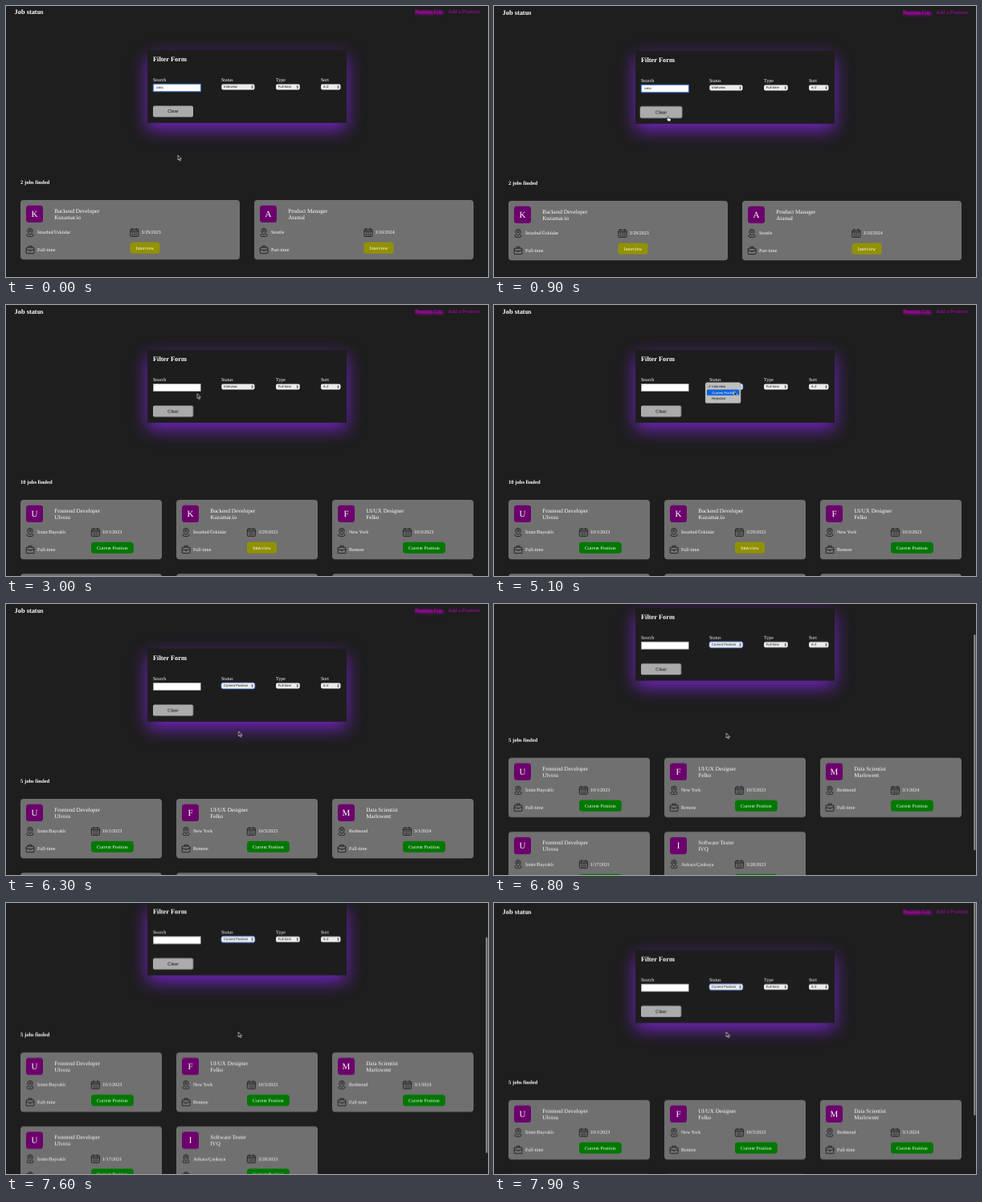
An HTML page that plays this animation: 600x338 px, repeating every 8000 ms.

```html
<!DOCTYPE html>
<html lang="en">
<head>
<meta charset="utf-8">
<title>Job status</title>
<style>
html, body { margin: 0; width: 100%; height: 100%; overflow: hidden; background: #1e1e1e; }
svg { display: block; width: 100vw; height: 100vh; }
text { font-family: "Liberation Serif", "Times New Roman", serif; fill: #fff; text-rendering: geometricPrecision; white-space: pre; }
.b { font-weight: bold; }
.ui { font-family: "Liberation Sans", Arial, sans-serif; fill: #161616; }
.link { fill: #bd00bd; }
.active { filter: drop-shadow(1px 1.2px .8px #d000d0) drop-shadow(1px 1px 1.5px #a000a0); }
.glow { fill: #7a26d0; opacity: .92; filter: blur(11px); }
.icon { fill: none; stroke: #141414; stroke-width: .8; stroke-linejoin: round; }

/* hard state changes */
.st { animation: 8s step-end infinite; }
.found { animation-name: found; }
.all { animation-name: all; }
.current { animation-name: current; }
.before { animation-name: before; }
.menu { animation-name: menu; }
.focus { animation-name: focus; }
.arrow { animation-name: arrow; }
.hand { animation-name: hand; }
.bar { animation-name: bar; }
.mark { animation-name: mark; }
.row0 { animation-name: row0; }
.row1 { animation-name: row1; }
@keyframes found { 0% { opacity: 1 } 13.75%, 100% { opacity: 0 } }
@keyframes all { 0% { opacity: 0 } 13.75% { opacity: 1 } 72.5%, 100% { opacity: 0 } }
@keyframes current { 0% { opacity: 0 } 72.5%, 100% { opacity: 1 } }
@keyframes before { 0% { opacity: 1 } 72.5%, 100% { opacity: 0 } }
@keyframes menu { 0% { opacity: 0 } 51.25% { opacity: 1 } 71.25%, 100% { opacity: 0 } }
@keyframes focus { 0% { opacity: 0 } 51.25%, 100% { opacity: 1 } }
@keyframes arrow { 0% { opacity: 1 } 10.3% { opacity: 0 } 24.25%, 100% { opacity: 1 } }
@keyframes hand { 0% { opacity: 0 } 10.3% { opacity: 1 } 24.25%, 100% { opacity: 0 } }
@keyframes bar { 0% { opacity: 0 } 83%, 100% { opacity: 1 } }
@keyframes mark { 0% { transform: translateY(-7.5px) } 62%, 100% { transform: none } }
@keyframes row0 { 0% { fill: #fff } 62%, 100% { fill: #161616 } }
@keyframes row1 { 0% { fill: #161616 } 62%, 100% { fill: #fff } }

/* motion */
.page { animation: scroll 8s linear infinite; }
.thumb { animation: thumb 8s linear infinite; }
.cursor { animation: move 8s ease-in-out infinite; }
.clear { transform-box: fill-box; transform-origin: center; animation: grow 8s linear infinite; }
@keyframes scroll {
  0% { transform: translateY(-1px) }
  1.25% { transform: translateY(-.6px) }
  2.5%, 82.5% { transform: translateY(0) }
  83.75% { transform: translateY(-18px) }
  85% { transform: translateY(-51px) }
  86.25% { transform: translateY(-73px) }
  87.5% { transform: translateY(-84px) }
  90%, 92.5% { transform: translateY(-89.6px) }
  93.75% { transform: translateY(-83px) }
  95% { transform: translateY(-57px) }
  96.25% { transform: translateY(-23px) }
  97.5% { transform: translateY(0) }
  98.75%, 100% { transform: translateY(2.7px) }
}
@keyframes thumb {
  0%, 82.5% { transform: translateY(0) }
  83.75% { transform: translateY(13px) }
  85% { transform: translateY(38px) }
  86.25% { transform: translateY(55px) }
  87.5% { transform: translateY(63px) }
  90%, 92.5% { transform: translateY(67.5px) }
  93.75% { transform: translateY(62px) }
  95% { transform: translateY(43px) }
  96.25% { transform: translateY(17px) }
  97.5% { transform: translateY(0) }
  98.75%, 100% { transform: translateY(-4px) }
}
@keyframes move {
  0%, 7.5% { transform: translate(214px, 186px) }
  10.6%, 17.5% { transform: translate(215px, 137px) }
  28.75%, 32.5% { transform: translate(236px, 117px) }
  37.5% { transform: translate(238px, 110.5px) }
  42.5% { transform: translate(284px, 102px) }
  53.75%, 60% { transform: translate(288px, 102px) }
  63.75%, 71.25% { transform: translate(299px, 107.5px) }
  80%, 100% { transform: translate(289.2px, 161px) }
}
@keyframes grow {
  0%, 10.3% { transform: scale(1) }
  11.2%, 24.25% { transform: scale(1.05) }
  25.5%, 100% { transform: scale(1) }
}
</style>
</head>
<body>
<svg id="stage" viewBox="0 0 600 338" preserveAspectRatio="none">
  <defs>
    <g id="pin" class="icon">
      <path d="M5 8.6C3 6 1.8 4.8 1.8 3.3a3.2 3.1 0 0 1 6.4 0C8.2 4.8 7 6 5 8.6z"/>
      <circle cx="5" cy="3.3" r="1.3"/>
      <path d="M2.6 7.2C-.8 8.3 .8 10.4 5 10.4S10.8 8.3 7.4 7.2"/>
    </g>
    <g id="cal" class="icon">
      <rect x=".4" y="1.4" width="10" height="9" rx=".8"/>
      <path d="M.4 3.8h10M2.8 .3v2M8 .3v2" stroke-width="1.1"/>
      <path d="M2.2 5.6h6.6M2.2 7.2h6.6M2.2 8.8h6.6" stroke-dasharray="1.1 .7"/>
    </g>
    <g id="bag" class="icon">
      <rect x=".4" y="2.8" width="9.8" height="7.4" rx=".8"/>
      <path d="M3.3 2.8V1h4v1.8M.4 5.2q4.9 3 9.8 0M5.3 5.8v1.6"/>
    </g>
  </defs>
</svg>
<script>
const text = (x, y, s, size, cls = '', extra = '') =>
  `<text x="${x}" y="${y}" font-size="${size}" class="${cls}" ${extra}>${s}</text>`;
const rect = (x, y, w, h, r, fill, extra = '') =>
  `<rect x="${x}" y="${y}" width="${w}" height="${h}" rx="${r}" fill="${fill}" ${extra}/>`;
const group = (cls, ...parts) => `<g class="${cls}">${parts.join('')}</g>`;
const icon = (id, x, y) => `<use href="#${id}" x="${x}" y="${y}"/>`;
const mid = 'text-anchor="middle"';

const badges = {
  'Interview': [37, '#929200'],
  'Current Position': [52.8, '#007800']
};

function card(x, y, w, job) {
  const box = rect(x, y, w, 74.2, 4, '#707070');
  if (!job) return box;
  const [title, firm, place, date, type, status] = job;
  const half = x + w / 2;
  const [bw, color] = badges[status];
  return box +
    rect(x + 7, y + 6.7, 21, 21.3, 3.5, '#6c006c') +
    text(x + 17.5, y + 20.8, firm[0], 11, '', mid) +
    text(x + 42.2, y + 15.9, title, 7.1) +
    text(x + 42.2, y + 24.2, firm, 7.1) +
    icon('pin', x + 7, y + 35.2) + text(x + 21, y + 42.4, place, 6) +
    icon('cal', half, y + 35) + text(half + 14, y + 42.4, date, 6) +
    icon('bag', x + 6.8, y + 56.4) + text(x + 21, y + 64, type, 6) +
    rect(half, y + 52.8, bw, 14, 3.5, color) +
    text(half + bw / 2, y + 61.7, status, 5.9, '', mid);
}

function list(cls, cols, jobs) {
  const w = cols === 2 ? 273 : 176;
  const cards = jobs.slice(0, 6).map((job, i) =>
    card(18 + i % cols * (w + 18), 243 + Math.floor(i / cols) * 92.2, w, job));
  return group('st ' + cls, text(18, 223.3, `${jobs.length} jobs finded`, 6.6, 'b'), ...cards);
}

const now = 'Current Position';
const front = ['Frontend Developer', 'Ulvora', 'İzmir/Bayraklı', '10/1/2023', 'Full-time', now];
const back = ['Backend Developer', 'Kuzamar.io', 'İstanbul/Üsküdar', '3/29/2023', 'Full-time', 'Interview'];
const design = ['UI/UX Designer', 'Felko', 'New York', '10/3/2023', 'Remote', now];
const manager = ['Product Manager', 'Atamal', 'Seattle', '3/10/2024', 'Part-time', 'Interview'];
const data = ['Data Scientist', 'Marlowent', 'Redmond', '3/1/2024', 'Full-time', now];
const older = ['Frontend Developer', 'Ulvora', 'İzmir/Bayraklı', '1/17/2021', 'Full-time', now];
const tester = ['Software Tester', 'IVQ', 'Ankara/Çankaya', '3/28/2023', 'Part-time', now];

const select = (x, w, inner) =>
  rect(x, 98.6, w, 6.8, 1.8, '#ececec') + inner +
  `<path d="M${x + w - 4.2} 101.5l1.2-1.6 1.2 1.6zm0 1l1.2 1.6 1.2-1.6z" fill="#222"/>`;
const option = (x, s, cls = '') => text(x + 2.8, 103.4, s, 4.2, 'ui ' + cls);

const header =
  text(10.5, 10.8, 'Job status', 8.4, 'b') +
  text(509, 10, 'Position List', 6.7, 'link active') +
  text(550, 10, 'Add a Position', 6.7, 'link');

const form =
  rect(176, 64, 248, 91, 0, '', 'class="glow"') +
  rect(176, 55.8, 248, 91, 0, '#1d1d1d') +
  text(183, 70.3, 'Filter Form', 8.4, 'b') +
  [['Search', 183], ['Status', 268], ['Type', 336], ['Sort', 392]]
    .map(([s, x]) => text(x, 95.3, s, 6)).join('') +
  rect(183.3, 98.3, 59, 9.4, 0, '#fff', 'stroke="#8a8a8a" stroke-width=".5"') +
  group('st found',
    rect(183.3, 98.2, 59, 9.6, .6, 'none', 'stroke="#4377dd" stroke-width="1.1"'),
    text(187.3, 104.4, 'ama', 4.3, 'ui')) +
  group('st focus', rect(267.9, 98.2, 42, 7.6, 2.2, '#3f78e0', 'stroke="#3f78e0" stroke-width=".8"')) +
  select(268.3, 41.2, option(268.3, 'Interview', 'st before') + option(268.3, now, 'st current')) +
  select(336, 29.8, option(336, 'Full-time')) +
  select(392, 24.5, option(392, 'A-Z')) +
  group('clear', rect(183, 125.4, 50, 14.2, 2, '#ababab'), text(208, 134.4, 'Clear', 5.7, 'ui', mid));

const menu = group('st menu',
  rect(263, 96.4, 44.2, 26.2, 2.6, '#bdbdbd', 'stroke="#777" stroke-width=".3"'),
  rect(265, 105.5, 40.3, 7.3, 1.4, '#0f62dc', 'class="st mark"'),
  '<path d="M266.6 101.6l1 1.2 1.6-2.8" fill="none" stroke="#161616" stroke-width=".6"/>',
  text(271.3, 103, 'Interview', 4.2, 'ui st row0'),
  text(271.3, 110.5, now, 4.2, 'ui st row1'),
  text(271.3, 118, 'Rejected', 4.2, 'ui'));

const cursor = group('cursor',
  '<path class="st arrow" d="M0 0v6l1.4-1.2 1 2.3 1-.4-1-2.2h1.9z" fill="#111" stroke="#fff" stroke-width=".6"/>',
  '<path class="st hand" d="M1 .6q.7-.6 1.2 .2V3l2.2 .4q.8 .2 .7 1L4.7 6.8H1.9L-.2 4.4q.2-.9 1.2-.2z" fill="#fff" stroke="#111" stroke-width=".5"/>');

document.getElementById('stage').insertAdjacentHTML('beforeend',
  group('page', header, form,
    list('found', 2, [back, manager]),
    list('all', 3, [front, back, design, ...Array(7).fill(null)]),
    list('current', 3, [front, design, data, older, tester]),
    menu) +
  group('st bar', rect(597.2, 0, 2.2, 269, 1.1, '#8c8c8c', 'class="thumb"')) +
  cursor);
</script>
</body>
</html>
```
